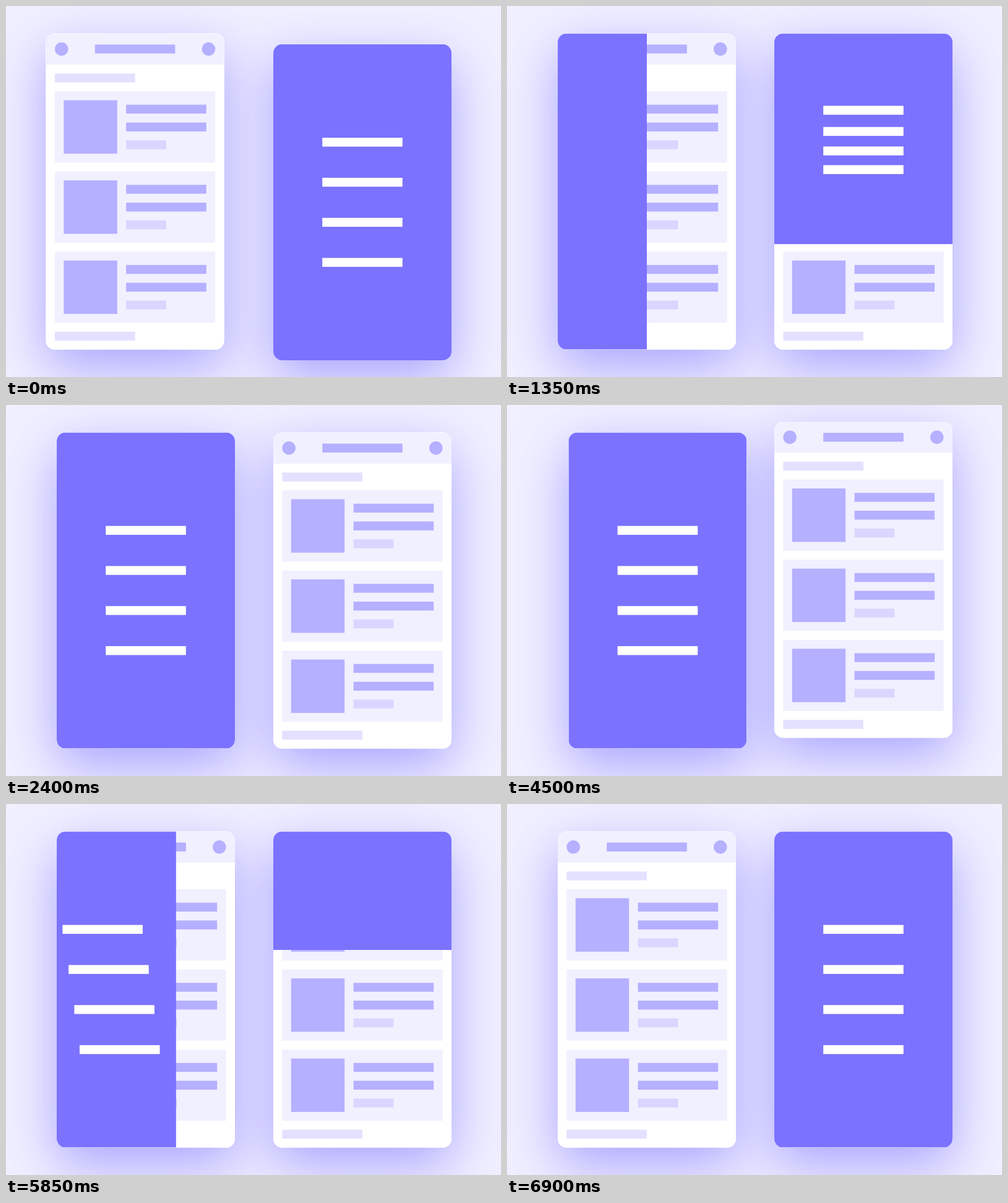
Write an HTML page with a canvas that moves like this. It is 800 px wide and 600 px high and loops after 9000 ms.

```html
<!DOCTYPE html>
<html lang="en">
<head>
<meta charset="utf-8">
<title>Menu transitions</title>
<style>
  html, body { margin: 0; width: 100%; height: 100%; overflow: hidden; background: #f1f0ff; }
  canvas { display: block; }
</style>
</head>
<body>
<canvas id="stage" width="800" height="600"></canvas>
<script>
const ctx = document.getElementById('stage').getContext('2d');
const EM = 14.4, W = 20, H = 35.5;            // phone size in em
const LOOP = 9000, HALF = LOOP / 2, STEP = 150;
const HOME = { left: [82, 44.4], right: [432, 44.4] };

// Menu timing inside each half: start, duration, delay of each bar
const TIMING = {
  left: {
    open: { start: 870, time: 960, delay: i => 191 + 100 * i },
    close: { start: 973, time: 967, delay: i => 60 + 25 * i }
  },
  right: {
    open: { start: 928, time: 1006, delay: i => 101 * (4 - i) },
    close: { start: 971, time: 967, delay: i => [218, 155, 100, 50][i] }
  }
};

function rect(x, y, w, h, color) {
  ctx.fillStyle = color;
  ctx.fillRect(x, y, w, h);
}

function dot(x, y, color) {
  ctx.fillStyle = color;
  ctx.beginPath();
  ctx.arc(x, y, 0.75, 0, Math.PI * 2);
  ctx.fill();
}

function phonePath() {
  ctx.beginPath();
  ctx.roundRect(0, 0, W, H, 1);
}

function at([x, y], draw) {
  ctx.save();
  ctx.translate(x, y);
  ctx.scale(EM, EM);
  draw();
  ctx.restore();
}

function shadow() {
  ctx.shadowColor = 'rgba(122, 114, 255, 0.6)';
  ctx.shadowBlur = 6 * EM;
  ctx.shadowOffsetY = 2 * EM;
  ctx.fillStyle = '#fff';
  phonePath();
  ctx.fill();
}

function page() {
  const strong = '#b5b0ff', pale = '#e3e1ff', panel = '#f1f0ff';
  rect(0, 0, W, H, '#fff');
  rect(0, 0, W, 3.5, panel);
  dot(1.75, 1.75, strong);
  dot(W - 1.75, 1.75, strong);
  rect(5.5, 1.25, 9, 1, strong);
  rect(1, 4.5, 9, 1, pale);
  for (let y = 6.5; y < 30; y += 9) {
    rect(1, y, 18, 8, panel);
    rect(2, y + 1, 6, 6, strong);
    rect(9, y + 1.5, 9, 1, strong);
    rect(9, y + 3.5, 9, 1, strong);
    rect(9, y + 5.5, 4.5, 1, '#dad6ff');
  }
  rect(1, 33.5, 9, 1, pale);
}

function ease(u) {
  return (1 - Math.cos(Math.PI * Math.min(1, Math.max(0, u)))) / 2;
}

function menu(side, opening, t) {
  const { start, time, delay } = TIMING[side][opening ? 'open' : 'close'];
  const shown = wait => {
    const p = ease((t - start - wait) / time);
    return opening ? p : 1 - p;
  };
  const sideways = side === 'left', cover = shown(0);
  rect(0, 0, sideways ? W * cover : W, sideways ? H : H * cover, '#7b72ff');
  for (let i = 0; i < 4; i++) {
    const away = 1 - shown(delay(i));
    const dx = sideways ? W * away : 0, dy = sideways ? 0 : H * away;
    rect(5.5 - dx, 10.5 + 4.5 * i - dy, 9, 1, '#fff');
  }
}

// Damped swing of the phone in px
function nudge(t) {
  if (t > 1150) return 0;
  const a = (t + 60) * Math.PI / 600;
  return 73 * Math.exp(-0.82 * a) * Math.sin(a);
}

function render(now) {
  const t = Math.floor(now % LOOP / STEP) * STEP;
  const first = t < HALF, phase = t % HALF;
  const push = nudge(phase) * (first ? 1 : -1);
  const spots = {
    left: [HOME.left[0] - push, HOME.left[1]],
    right: [HOME.right[0], HOME.right[1] + push]
  };
  rect(0, 0, 800, 600, '#f1f0ff');
  for (const side in spots) at(spots[side], shadow);
  for (const side in spots) at(spots[side], () => {
    phonePath();
    ctx.fillStyle = '#fff';
    ctx.fill();
    ctx.clip();
    page();
    menu(side, first === (side === 'left'), phase);
  });
}

const begin = performance.now();
function tick() {
  render(performance.now() - begin);
  requestAnimationFrame(tick);
}
tick();
</script>
</body>
</html>
```
